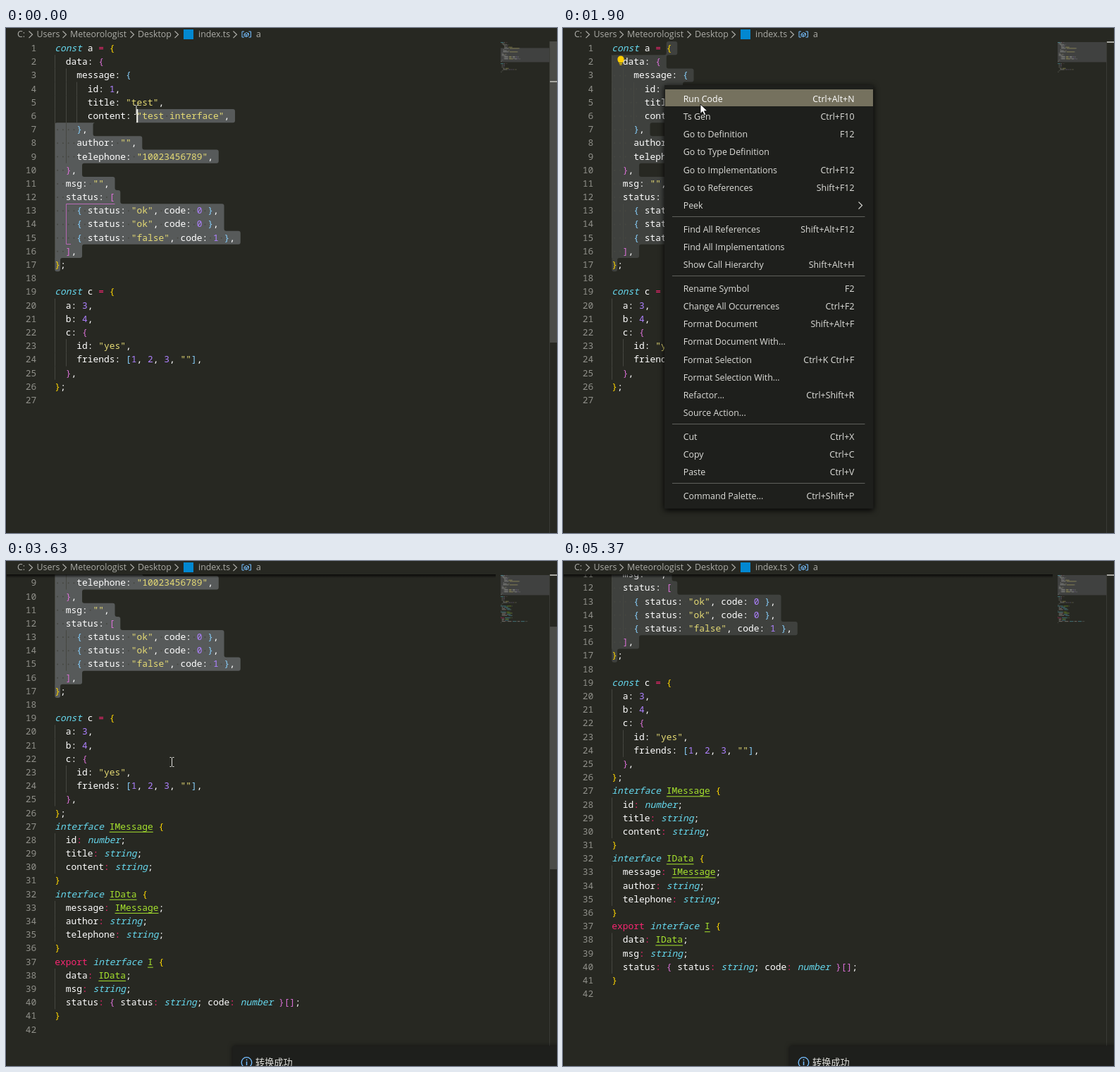
Recreate the animation shown at these times as an HTML page. Size 782 by 716 pixels, loop 5.47 s.

```html
<!DOCTYPE html>
<html lang="en">
<head>
<meta charset="utf-8">
<title>Editor: generate interfaces</title>
<style>
html, body { margin: 0; width: 100%; height: 100%; overflow: hidden; background: #272822; }
svg { display: block; }
text { font: 12.4px "Open Sans", "Noto Sans", sans-serif; fill: #dededa; white-space: pre; }
.code text { font: 500 12.917px "Noto Sans Mono", "DejaVu Sans Mono", monospace; fill: #fff; }
.code .num { fill: #90908a; text-anchor: end; font-weight: 400; }
.code .kw { fill: #66d9ef; font-style: italic; }
.code .op { fill: #f92672; }
.code .str { fill: #e6db74; }
.code .lit { fill: #ae81ff; }
.code .type { fill: #a6e22e; }
.code .b0 { fill: #ffd700; }
.code .b1 { fill: #da70d6; }
.code .b2 { fill: #87cefa; }
.raw text:not(.num) { fill: #fff; font-style: normal; }
.raw .under { display: none; }
.crumb text { fill: #acaca7; }
.hot text { fill: #fff; }
.end { text-anchor: end; }
.cjk { font-family: "Noto Sans CJK SC", "Noto Sans CJK", sans-serif; font-size: 13.2px; }
</style>
</head>
<body>
<script>
const LOOP = 5470, LEFT = 69.3, TOP = 19, CW = 7.75, LH = 19.19, ITEM_H = 25.23;
const MAP_X = 702, MAP_Y = 20, MAP_H = 1.67, MAP_CW = 0.85;

const source = `const a = {
  data: {
    message: {
      id: 1,
      title: "test",
      content: "test interface",
    },
    author: "",
    telephone: "10023456789",
  },
  msg: "",
  status: [
    { status: "ok", code: 0 },
    { status: "ok", code: 0 },
    { status: "false", code: 1 },
  ],
};

const c = {
  a: 3,
  b: 4,
  c: {
    id: "yes",
    friends: [1, 2, 3, ""],
  },
};
interface IMessage {
  id: number;
  title: string;
  content: string;
}
interface IData {
  message: IMessage;
  author: string;
  telephone: string;
}
export interface I {
  data: IData;
  msg: string;
  status: { status: string; code: number }[];
}
`.split("\n");

const FIRST_NEW = 27;
const colX = c => LEFT + c * CW;
const rowY = n => TOP + (n - 1) * LH;

function el(parent, tag, attrs = {}, text) {
  const e = document.createElementNS("http://www.w3.org/2000/svg", tag);
  for (const k in attrs) e.setAttribute(k, attrs[k]);
  if (text !== undefined) e.textContent = text;
  parent.appendChild(e);
  return e;
}
const rect = (p, x, y, width, height, fill, more) => el(p, "rect", { x, y, width, height, fill, ...more });
const line = (p, d, stroke, more) => el(p, "path", { d, stroke, fill: "none", ...more });
const show = (e, on) => e.setAttribute("display", on ? "inline" : "none");
const move = (e, x, y) => e.setAttribute("transform", `translate(${x} ${y})`);

const svg = el(document.body, "svg", { width: 782, height: 716, viewBox: "0 0 782 716" });
const defs = el(svg, "defs");
rect(el(defs, "clipPath", { id: "view" }), 0, TOP, 782, 697, "#000");
const selClip = el(el(defs, "clipPath", { id: "picked" }), "path");
const fade = el(defs, "linearGradient", { id: "fade", x2: 0, y2: 1 });
el(fade, "stop", { "stop-color": "#000", "stop-opacity": 0.75 });
el(fade, "stop", { offset: 1, "stop-color": "#000", "stop-opacity": 0 });

rect(svg, 0, 0, 782, 716, "#272822");

// Editor layers
const pane = el(svg, "g", { "clip-path": "url(#view)" });
const code = el(pane, "g", { class: "code" });
const sel = el(code, "path");
const guides = el(code, "g");
const dots = el(code, "g", { "clip-path": "url(#picked)", fill: "#464741" });
const base = el(code, "g");
const extra = el(code, "g");
const caret = rect(code, 0, 0, 2, LH, "#f8f8f0");
const map = el(svg, "g");
const mapSel = rect(map, MAP_X, MAP_Y, 69, 0, "#404140");
const mapBase = el(map, "g", { opacity: 0.45 });
const mapExtra = el(map, "g", { opacity: 0.45 });

function kind(tok, fresh) {
  if (tok[0] === '"') return "str";
  if (/^(const|interface|number|string)$/.test(tok)) return "kw";
  if (tok === "export" || tok === "=" || (tok === ":" && fresh)) return "op";
  if (/^\d/.test(tok)) return "lit";
  if (/^I/.test(tok)) return "type";
  return "";
}

const tint = { str: "#e6db74", kw: "#66d9ef", op: "#f92672", lit: "#ae81ff", type: "#a6e22e" };
let depth = 0;
source.forEach((text, i) => {
  const n = i + 1, fresh = n >= FIRST_NEW;
  const group = fresh ? extra : base, mini = fresh ? mapExtra : mapBase;
  const y = rowY(n) + 14;
  el(n > FIRST_NEW ? extra : base, "text", { class: "num", x: 43.3, y }, n);
  for (const m of text.matchAll(/"[^"]*"|\w+|\S/g)) {
    const tok = m[0];
    let cls = kind(tok, fresh);
    if (/[{[]/.test(tok)) cls = "b" + depth++;
    else if (/[}\]]/.test(tok)) cls = "b" + --depth;
    const x = colX(m.index);
    el(group, "text", { class: cls, x, y }, tok);
    if (cls === "type") {
      line(group, `M${x} ${y + 3.5}h${tok.length * CW}`, "#a6e22e", { class: "under" });
    }
    rect(mini, MAP_X + m.index * MAP_CW, MAP_Y + i * MAP_H, tok.length * MAP_CW, 1, tint[cls] || "#d8d8d2",
      { opacity: /\w/.test(tok) ? 0.9 : 0.5 });
  }
  const indent = text.search(/\S/);
  for (let c = 0; c < indent; c += 2) {
    rect(fresh ? extra : guides, Math.round(colX(c)), rowY(n), 1, LH, "#464741");
  }
  if (n <= 17) for (const m of text.matchAll(/ /g)) {
    el(dots, "circle", { cx: colX(m.index + 0.5), cy: rowY(n) + 10, r: 1 });
  }
});
const pair = line(code, "M154.5 249.5H85.5V306.5H92", "#da70d6", { opacity: 0.75 });

const bulb = el(code, "g");
el(bulb, "path", { d: "M79.5 49c-3-2-3.3-9.5 2.5-9.5s5.5 7.5 2.5 9.5z", fill: "#ffcc00" });
rect(bulb, 79.7, 49.8, 4.6, 1.2, "#ffcc00");
rect(bulb, 80.5, 51.6, 3, 1, "#ffcc00");

const shade = rect(svg, 0, TOP, 695, 5, "url(#fade)");
rect(svg, 0, 0, 1, 716, "#1e1f1c");
rect(svg, 771, TOP, 1, 697, "#3a3b36");
const thumb = rect(svg, 772, TOP, 10, 427, "#4b4c48");
const mark = rect(svg, 772, 19, 10, 2, "#a8a8a2");

// Breadcrumbs
const crumb = el(svg, "g", { class: "crumb" });
[[16, "C:"], [43.5, "Users"], [91, "Meteorologist"], [187, "Desktop"], [273, "index.ts"], [355, "a"]]
  .forEach(([x, s]) => el(crumb, "text", { x, y: 13.4 }, s));
[35, 83, 179, 242, 325].forEach(x => line(crumb, `M${x - 2.5} 4.5l5 4.8-5 4.8`, "#acaca7", { "stroke-width": 1.2 }));
rect(crumb, 252, 2, 14, 14, "#0288d1");
line(crumb, "M338 5h-3v8h3M344.5 5h3v8h-3M338 8.5l3.5-2 3 1.5v2.5l-3.5 2-3-1.5zM338 8.5l3 1.5 3.5-2M341 10v2.5", "#75beff");

// Notification
const toast = el(svg, "g");
rect(toast, 321.5, 687.5, 470, 40, "#1e1f1c", { rx: 2, style: "filter:drop-shadow(0 0 3px #0008)" });
const note = el(toast, "g");
el(note, "circle", { cx: 341.5, cy: 711, r: 7.3, fill: "none", stroke: "#75beff", "stroke-width": 1.3 });
rect(note, 340.8, 709.5, 1.5, 5.5, "#75beff");
rect(note, 340.8, 706.5, 1.5, 1.6, "#75beff");
el(note, "text", { class: "cjk", x: 354, y: 716 }, "转换成功");

// Context menu
const groups = [
  "Run Code|Ctrl+Alt+N,Ts Gen|Ctrl+F10,Go to Definition|F12,Go to Type Definition,Go to Implementations|Ctrl+F12,Go to References|Shift+F12,Peek|>",
  "Find All References|Shift+Alt+F12,Find All Implementations,Show Call Hierarchy|Shift+Alt+H",
  "Rename Symbol|F2,Change All Occurrences|Ctrl+F2,Format Document|Shift+Alt+F,Format Document With...,Format Selection|Ctrl+K Ctrl+F,Format Selection With...,Refactor...|Ctrl+Shift+R,Source Action...",
  "Cut|Ctrl+X,Copy|Ctrl+C,Paste|Ctrl+V",
  "Command Palette...|Ctrl+Shift+P"
];
const menu = el(svg, "g");
rect(menu, 144, 81, 296.5, 600.5, "#1e1f1c", { style: "filter:drop-shadow(0 2px 4px #000)" });
const hover = rect(menu, 145, 87, 295, 24, "#75715e");
const rows = [];
let itemY = 100;
groups.forEach((g, gi) => {
  if (gi) rect(menu, 155, Math.floor(itemY - 17.6), 273.5, 1, "#5f605c");
  for (const item of g.split(",")) {
    const [name, key] = item.split("|"), row = el(menu, "g");
    el(row, "text", { x: 170.7, y: itemY + 4.6 }, name);
    if (key === ">") line(row, `M419.5 ${itemY - 4.8}l5 5-5 5`, "#dededa", { "stroke-width": 1.2 });
    else if (key) el(row, "text", { class: "end", x: 413.5, y: itemY + 4.6 }, key);
    rows.push(row);
    itemY += ITEM_H;
  }
  itemY += 8.37;
});

// Pointers
const beam = line(svg, "M-3-6.5h2.2M.8-6.5h2.2M0-6V6M-3 6.5h2.2M.8 6.5h2.2", "#e2e2de");
const arrow = el(svg, "path", { d: "M0 0V13.5l3.1-2.9 2.2 5.1 2.4-1-2.2-5H10z", fill: "#fff", stroke: "#000", "stroke-width": 0.8 });

// Value of the last entry that has started
const at = (list, t) => list.reduce((v, e) => (e[0] <= t ? e : v)).slice(1);

const picks = [[0, 6, 15], [120, 3, 11], [260, 2, 9], [380, 1, 9], [510, 1, 10]];
const scrolls = [[0, 0], [3390, 50.4], [3510, 100.8], [3630, 151.2], [3770, 201.6]];
const mouse = [
  [0, 185, 116], [120, 160, 78], [260, 150, 52], [380, 145, 34], [510, 147, 29], [630, 147, 27],
  [930, 147.5, 55], [1060, 147.5, 80], [1360, 147, 80], [1510, 171, 117], [1650, 185, 110],
  [1770, 192, 108], [1900, 195, 108], [2420, 214, 132], [2570, 216, 135], [2720, 213, 130],
  [2840, 211.5, 127.5], [2960, 222, 200], [3080, 235.5, 285], [3770, 215, 320], [3890, 160, 365],
  [4020, 108, 404], [4170, 205, 455], [4290, 325, 530], [4410, 455, 602.5], [4530, 630, 665], [4650, 900, 800]
];

// Polygon outline with softened corners
function soften(pts, r) {
  return pts.map((p, i) => {
    const toward = q => {
      const len = Math.hypot(q[0] - p[0], q[1] - p[1]) || 1, k = Math.min(r, len / 2) / len;
      return `${p[0] + (q[0] - p[0]) * k} ${p[1] + (q[1] - p[1]) * k}`;
    };
    const a = toward(pts[(i + pts.length - 1) % pts.length]), b = toward(pts[(i + 1) % pts.length]);
    return `${i ? "L" : "M"}${a}Q${p[0]} ${p[1]} ${b}`;
  }).join("") + "Z";
}

function selection(row, col) {
  const pts = [[colX(col), rowY(row)]];
  for (let n = row; n <= 17; n++) {
    const x = colX(n === 17 ? 1 : source[n - 1].length + 1);
    const last = pts[pts.length - 1];
    if (n > row && last[0] === x) pts.pop();
    else pts.push([x, rowY(n)]);
    pts.push([x, rowY(n + 1)]);
  }
  pts.push([LEFT, rowY(18)], [LEFT, rowY(row + 1)], [colX(col), rowY(row + 1)]);
  return soften(pts, 3);
}

function draw(t) {
  const [row, col] = at(picks, t), [scroll] = at(scrolls, t), [mx, my] = at(mouse, t);
  const inMenu = t >= 1360 && t < 2720;
  const blurred = (t >= 1200 && t < 2720) || t >= 5370;
  const grown = t >= 2960;

  move(code, 0, -scroll);
  const d = selection(row, col);
  sel.setAttribute("d", d);
  selClip.setAttribute("d", d);
  sel.setAttribute("fill", blurred ? "#3f413e" : "#575a5a");
  caret.setAttribute("x", colX(col) - 0.3);
  caret.setAttribute("y", rowY(row));
  show(caret, t < 930 || t >= 2720);
  show(pair, t < 260);
  show(bulb, t >= 780);
  show(extra, grown);
  show(mapExtra, grown);
  extra.setAttribute("class", t < 3230 ? "raw" : "");
  show(shade, scroll > 0);

  const top = MAP_Y + (row - 1) * MAP_H;
  mapSel.setAttribute("y", top);
  mapSel.setAttribute("height", MAP_Y + 17 * MAP_H - top);
  mark.setAttribute("y", 19 + (row - 1) * 11.2);
  thumb.setAttribute("y", TOP + scroll * 0.49);
  thumb.setAttribute("height", grown ? 344 : 427);
  show(thumb, !inMenu && t < 5070);

  show(toast, t >= 3080);
  show(note, t >= 3230);

  show(menu, inMenu);
  const pick = t < 1510 ? -1 : t < 1650 || t >= 2420 ? 1 : 0;
  show(hover, pick >= 0);
  hover.setAttribute("y", 87 + pick * 25);
  rows.forEach((r, i) => r.setAttribute("class", i === pick ? "hot" : ""));

  show(beam, !inMenu);
  show(arrow, inMenu);
  move(beam, mx, my);
  move(arrow, mx, my);
}

const start = performance.now();
function tick() {
  draw((performance.now() - start) % LOOP);
  requestAnimationFrame(tick);
}
tick();
</script>
</body>
</html>
```
